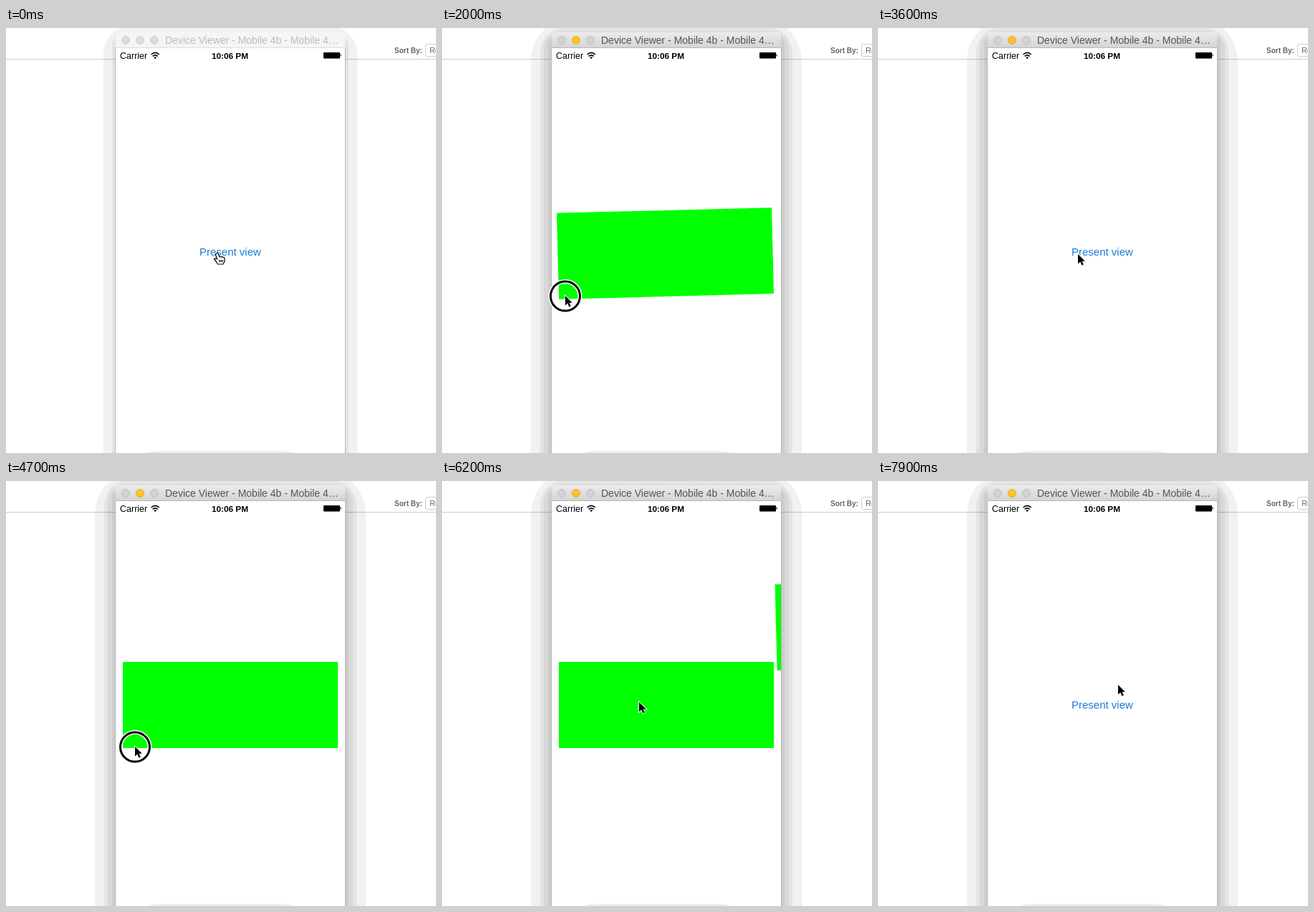
Recreate the animation shown at these times as an HTML page. Size 600x592 px, loop 8000 ms.

```html
<!DOCTYPE html>
<html lang="en">
<head>
<meta charset="utf-8">
<title>Flick a view away</title>
<style>
  html, body { margin: 0; width: 100%; height: 100%; overflow: hidden; background: #fff; }
  svg { display: block; width: 600px; height: 592px; font-family: "Liberation Sans", Arial, sans-serif; }
  .dot { fill: #dcdcdc; stroke: #d0d0d0; }
  .active .dot { fill: #d2d2d2; stroke: #c2c2c2; }
  .active .dot.hot { fill: #fdc02f; stroke: #e6ac2c; }
  .title { fill: #bcbcbc; font-size: 14px; }
  .active .title { fill: #555; }
  .bar { fill: #f4f5f4; }
  .active .bar { fill: url(#barFill); }
  .edge { stroke: #ddd; }
  .active .edge { stroke: #b8b8b8; }
  #activeShadow, .active #idleShadow { display: none; }
  .active #activeShadow { display: inline; }
</style>
</head>
<body>
<svg id="stage" viewBox="0 0 600 592">
  <defs>
    <linearGradient id="barFill" x2="0" y2="1">
      <stop stop-color="#ececec"/><stop offset="1" stop-color="#d4d4d4"/>
    </linearGradient>
    <clipPath id="screen"><path d="M153 28H473V592H153Z"/></clipPath>
  </defs>

  <!-- page behind the window -->
  <path d="M0 43.5H600" stroke="#ccc"/>
  <text x="542" y="35" font-size="10" font-weight="bold" fill="#666">Sort By:</text>
  <rect x="585.5" y="22.5" width="40" height="17" rx="2" fill="#fff" stroke="#ccc"/>
  <text x="591" y="35" font-size="11" fill="#666">Re</text>
  <g id="idleShadow"></g>
  <g id="activeShadow"></g>

  <!-- simulator window -->
  <path d="M152.5 592V27.5H473.5V592" fill="#fff" stroke="#b4b4b4"/>
  <path class="bar" d="M153 27V10Q153 6 157 6H469Q473 6 473 10V27Z"/>
  <path class="edge" d="M153 27.5H473"/>
  <circle class="dot" cx="167" cy="17" r="5.5"/>
  <circle class="dot hot" cx="187" cy="17" r="5.5"/>
  <circle class="dot" cx="207" cy="17" r="5.5"/>
  <text class="title" x="222" y="22">Device Viewer - Mobile 4b - Mobile 4…</text>
  <path d="M198 592Q204 589 218 589H382Q396 589 402 592Z" fill="#eee"/>

  <!-- status bar -->
  <text x="159" y="43" font-size="12.5">Carrier</text>
  <path d="M202.6 37Q208.2 31.8 213.8 37M204.7 39.4Q208.2 36.2 211.7 39.4" fill="none" stroke="#000" stroke-width="1.7"/>
  <path d="M206.2 41Q208.2 39.3 210.2 41L208.2 43Z"/>
  <text x="312.5" y="42.5" font-size="11.8" font-weight="bold" text-anchor="middle">10:06 PM</text>
  <rect x="443" y="34" width="23" height="8.5" rx="1"/>
  <path d="M466.5 36.5h1v3h-1z"/>

  <text x="270" y="317" font-size="15" fill="#1a7bd4">Present view</text>
  <g id="views" clip-path="url(#screen)" fill="#0f0"></g>

  <g id="pointer">
    <g id="ring" fill="none">
      <circle r="20.5" cy=".5" stroke="#fff" stroke-width="6"/>
      <circle r="20.5" cy=".5" stroke="#000" stroke-width="3"/>
    </g>
    <path id="arrow" d="M0 0V13.5L3.2 10.6L5.4 15.5L7.8 14.4L5.6 9.7H9.8Z"
          stroke="#fff" stroke-width="1.8" paint-order="stroke"/>
    <path id="hand" fill="#fff" stroke="#000" stroke-width="1.2" stroke-linejoin="round" transform="translate(-1.5)"
          d="M-3 0Q-1-1 0 1L1.5 5Q3 3.5 4 5Q5.5 4 6.5 5.6Q8.5 5 8.5 7.5V11L6.5 15H-1L-3.5 11L-6 8Q-5.500 6-3 7.500L-1.800 8L-4 2Q-4.300 .6-3 0M1.200 9v3M3.400 9v3M5.500 9v3"/>
  </g>
</svg>
<script>
const LOOP = 8000, STEP = 100, ACTIVATE = 200;
const FADE = 300, TAP = 200, GLIDE = 600;
const REST = { x: 313, y: 312 };

// A view fades in, is held, accelerates from launch to release, then coasts.
// Velocity (vx, vy) is in px/ms and spin in degrees/ms; swing is the sway while held.
const throws = [
  { appear: 300, hold: 1600, launch: 2500, release: 2700, vx: .275, vy: .6, spin: .232, tilt: 0, swing: 12 },
  { appear: 3700, hold: 4700, launch: 4900, release: 5300, vx: .2755, vy: -.1015, spin: 0, tilt: -1.4, swing: 0 },
  { appear: 5900, hold: 6900, launch: 7000, release: 7400, vx: -.75, vy: -.7, spin: -.1, tilt: -10, swing: 0 }
];

// Where the pointer arrives: time, x, y
const stops = [
  [0, 298, 314], [700, 308, 312], [1600, 172, 362], [2000, 172, 373],
  [2500, 167, 386], [2800, 233, 462], [3500, 279, 315], [4700, 180, 370],
  [5500, 294, 337], [6200, 275, 308], [6900, 442, 360], [7500, 340, 38], [7900, 335, 284]
];

const byId = id => document.getElementById(id);
const show = (el, visible) => el.setAttribute('display', visible ? 'inline' : 'none');
const progress = (t, from, to) => Math.min(1, Math.max(0, (t - from) / (to - from)));
const smooth = k => k * k * (3 - 2 * k);

function addRect(parent, attributes) {
  const rect = document.createElementNS('http://www.w3.org/2000/svg', 'rect');
  for (const [name, value] of Object.entries(attributes)) rect.setAttribute(name, value);
  return byId(parent).appendChild(rect);
}

// Stacked translucent bands, each spreading a given distance beyond the window
function addShadow(parent, spreads) {
  for (const spread of spreads)
    addRect(parent, {
      x: 153 - spread, y: 18 - spread * 1.2, width: 320 + spread * 2, height: 700,
      rx: spread * 2.2, 'fill-opacity': .056
    });
}

function pose({ hold, launch, release, vx, vy, spin, tilt, swing }, t) {
  const push = progress(t, launch, release);
  const travel = (release - launch) * push * push / 2 + Math.max(0, t - release);
  const sway = swing * Math.sin(Math.PI * progress(t, hold, launch) ** 4);
  return {
    x: REST.x + vx * travel - sway,
    y: REST.y + vy * travel + sway * 4 / 3,
    angle: tilt * push + spin * travel - sway
  };
}

function pointerAt(t) {
  const next = stops.findIndex(([time]) => time > t);
  if (next < 0) return stops.at(-1).slice(1);
  const [left, ...from] = stops[next - 1], [arrive, ...to] = stops[next];
  const k = smooth(progress(t, Math.max(left, arrive - GLIDE), arrive));
  return from.map((v, i) => v + (to[i] - v) * k);
}

addShadow('idleShadow', [17, 5]);
addShadow('activeShadow', [29, 16, 11, 5]);
const views = throws.map(() => addRect('views', { x: -150, y: -60, width: 300, height: 120 }));

function draw(now) {
  const t = Math.floor(now % LOOP / STEP) * STEP;
  byId('stage').classList.toggle('active', t >= ACTIVATE);

  throws.forEach((flick, i) => {
    const { x, y, angle } = pose(flick, t);
    views[i].setAttribute('transform', `translate(${x} ${y}) rotate(${angle})`);
    views[i].setAttribute('opacity', progress(t + STEP, flick.appear, flick.appear + FADE));
  });

  byId('pointer').setAttribute('transform', `translate(${pointerAt(t)})`);
  show(byId('ring'), throws.some(({ appear, hold, release }) =>
    t >= appear && t < appear + TAP || t >= hold && t < release));
  show(byId('hand'), t < ACTIVATE);
  show(byId('arrow'), t >= ACTIVATE);
}

const begin = performance.now();
function tick() {
  draw(performance.now() - begin);
  requestAnimationFrame(tick);
}
tick();
</script>
</body>
</html>
```
